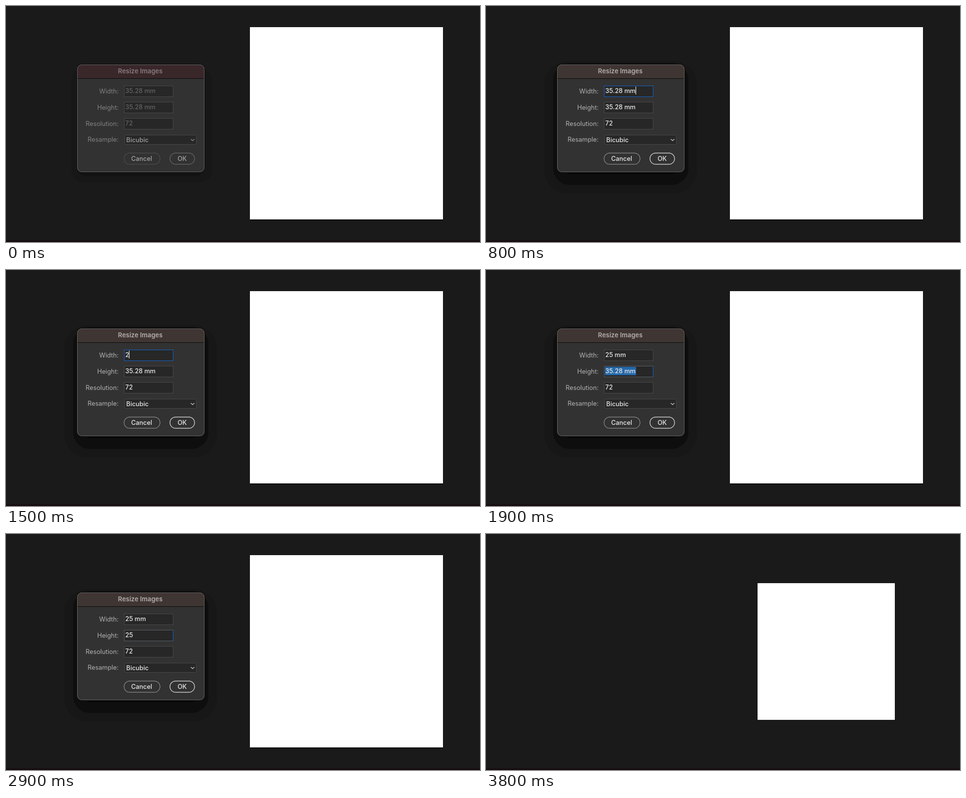
An HTML page for the animation above (4.9 s loop, 960 px wide and 480 px high).

```html
<!DOCTYPE html>
<html lang="en">
<head>
<meta charset="utf-8">
<title>Resize dialog</title>
<style>
  html, body { margin: 0; width: 100%; height: 100%; overflow: hidden; background: #1a1a1a; }
  svg { display: block; width: 100vw; height: 100vh; --k: 1; }
  text { font: 12.8px Inter, "Liberation Sans", sans-serif; fill: #e8e8e8; }
  .label { fill: #b2b2b2; text-anchor: end; }
  .value { font-weight: 500; }
  .button { font-weight: 500; text-anchor: middle; }
  .title { font-size: 13px; font-weight: 600; fill: #b5afad; text-anchor: middle; }
  .box { fill: #272727; stroke: #484848; }
  .ring { fill: none; stroke: #8c8c8c; stroke-width: 1.2; }
  .soft { opacity: calc(.62 + .38 * var(--k)); }
  .faint { opacity: calc(.3 + .7 * var(--k)); }
  .warm { opacity: var(--k); }
</style>
</head>
<body>
<svg viewBox="0 0 960 480">
  <rect width="960" height="480" fill="#1a1a1a"/>
  <rect y="477" width="960" height="3" fill="#140c10"/>
  <rect id="paperShade" fill="#161616"/>
  <rect id="paper" fill="#fff"/>
  <g id="dialog">
    <g id="smallShade">
      <rect x="132" y="128" width="286" height="230" rx="24" fill="#171717"/>
      <rect x="144" y="300" width="258" height="46" rx="18" fill="#121212"/>
    </g>
    <g id="bigShade">
      <rect x="118" y="112" width="309" height="270" rx="48" fill="#171717"/>
      <rect x="136" y="116" width="274" height="248" rx="34" fill="#0e0e0e"/>
      <rect x="160" y="300" width="226" height="42" rx="12" fill="#070707"/>
    </g>
    <rect x="143" y="118" width="260" height="221" rx="10.5" fill="#060606"/>
    <rect x="144" y="119" width="258" height="219" rx="9.5" fill="#323232"/>
    <path id="bar" d="M144 147V129a10 10 0 0 1 10-10H392a10 10 0 0 1 10 10V147Z" fill="#3a272a"/>
    <path class="warm" d="M144 147V129a10 10 0 0 1 10-10H392a10 10 0 0 1 10 10V147Z" fill="#3f3533"/>
    <rect x="144" y="147" width="258" height="1" fill="#090909"/>
    <rect x="144.5" y="119.5" width="257" height="218" rx="9" fill="none" stroke="#686868"/>
    <text class="title soft" x="272" y="137">Resize Images</text>
    <g class="soft">
      <text class="label" x="228" y="178">Width:</text>
      <text class="label" x="228" y="211">Height:</text>
      <text class="label" x="228" y="244">Resolution:</text>
      <text class="label" x="228" y="276">Resample:</text>
    </g>
    <rect class="box" x="239.5" y="162.5" width="99" height="22"/>
    <rect class="box" x="239.5" y="195.5" width="99" height="22"/>
    <rect class="box" x="239.5" y="228.5" width="99" height="22"/>
    <rect class="box" x="240.5" y="262.5" width="145" height="19" rx="2"/>
    <rect id="widthFocus" x="239.5" y="162.5" width="99" height="22" fill="none" stroke="#1463c8"/>
    <g id="heightFocus" fill="none">
      <rect x="239.5" y="195.5" width="99" height="22" stroke="#575d64"/>
      <path d="M338.5 195V218" stroke="#1463c8"/>
    </g>
    <rect id="selection" x="241" width="63" height="17" fill="#2568aa"/>
    <g class="faint">
      <text id="widthText" class="value" x="241.6" y="177"></text>
      <text id="heightText" class="value" x="241.6" y="210"></text>
      <text class="value" x="241.6" y="243">72</text>
    </g>
    <rect id="caret" width="1" height="16" fill="#fff"/>
    <g class="soft">
      <text class="value" x="243.6" y="277">Bicubic</text>
      <path d="M374.5 270.8L378 274L381.500 270.8" fill="none" stroke="#d8d8d8" stroke-width="1.2"/>
    </g>
    <g class="faint">
      <rect class="ring" x="239.1" y="299.1" width="72.800" height="22.800" rx="11.4"/>
      <rect id="ok" class="ring" x="332.1" y="299.1" width="49.800" height="22.800" rx="11.4" style="stroke:#e6e6e6"/>
    </g>
    <g class="soft">
      <text class="button" x="274.700" y="315">Cancel</text>
      <text id="okText" class="button" x="356.800" y="315">OK</text>
    </g>
  </div></g>
</svg>
<script>
const LOOP = 4900;
const $ = id => document.getElementById(id);
const show = (id, on) => $(id).style.display = on ? "" : "none";
const set = (id, attrs) => {
  for (const name in attrs) $(id).setAttribute(name, attrs[name]);
};
const full = "35.28 mm", done = "25 mm";

// Each row: start time, brightness, width, height, caret x, selected row
const steps = [
  [0, 0, full, full],
  [100, .03, full, full],
  [200, .06, full, full],
  [700, .6, full, full, 303],
  [800, 1, full, full, 303],
  [1100, 1, full, full, 0, 1],
  [1500, 1, "2", full, 249],
  [1600, 1, "25", full, 257],
  [1900, 1, done, full, 0, 2],
  [2200, 1, done, "2", 249],
  [2300, 1, done, "25", 257],
  [2900, 1, done, "25"],
  [3300, 1, done, done]
];

function draw(t) {
  const [, k, width, height, caret, selected] = steps.findLast(s => s[0] <= t);
  const onWidth = t >= 700 && t < 1900;
  const onHeight = t >= 1900 && t < 3300;
  const resized = t >= 3300;

  document.querySelector("svg").style.setProperty("--k", k);
  show("dialog", t < 3800);
  show("smallShade", t < 700);
  show("bigShade", t >= 700);
  show("widthFocus", onWidth);
  show("heightFocus", onHeight);

  $("widthText").textContent = width;
  $("heightText").textContent = height;
  show("caret", caret);
  set("caret", { x: caret || 0, y: onHeight ? 197 : 164 });
  show("selection", selected);
  set("selection", { y: selected === 2 ? 197 : 164 });

  $("ok").style.fill = resized ? "#e0e0e0" : "none";
  $("okText").style.fill = resized ? "#323232" : "";

  const [x, y, size] = resized ? [550, 100, 278] : [494, 43, 391];
  set("paper", { x, y, width: size, height: size });
  set("paperShade", { x, y: y + 3, width: size, height: size });
  show("paperShade", t < 3800);
}

function tick(now) {
  draw(now % LOOP);
  requestAnimationFrame(tick);
}
draw(0);
requestAnimationFrame(tick);
</script>
</body>
</html>
```
